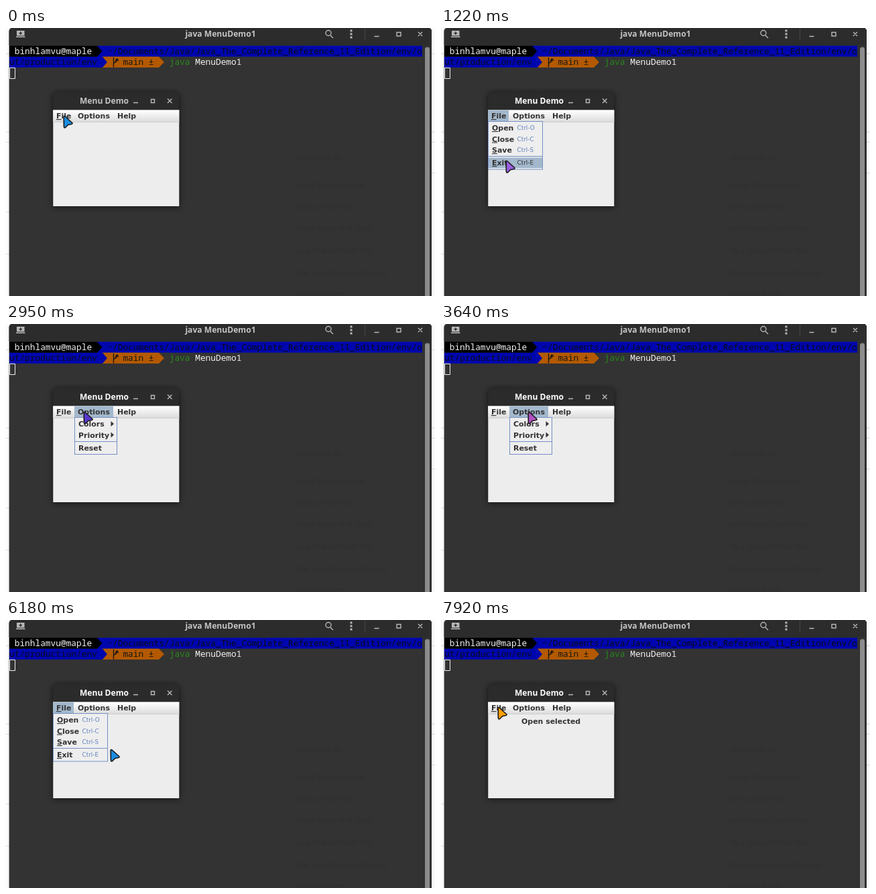
Recreate the animation shown at these times as an HTML page. Size 640x400 px, loop 8000 ms.

```html
<!DOCTYPE html>
<html lang="en">
<head>
<meta charset="utf-8">
<title>Menu Demo</title>
<style>
  html, body { margin: 0; width: 100%; height: 100%; overflow: hidden; background: #fafafa; }
  svg { display: block; width: 640px; height: 400px; }
  .title { font: bold 12.1px "Open Sans", sans-serif; text-anchor: middle; fill: #c4c4c4; }
  .term { font: 12.83px "Noto Sans Mono", monospace; }
  .path { font-weight: 500; fill: #0a0a18; }
  .ghost { font: 11.5px "Open Sans", sans-serif; fill: #2f2f2f; }
  .menu { font: bold 10.95px "DejaVu Sans", sans-serif; fill: #333; }
  .accel { font: 8.9px "DejaVu Sans", sans-serif; fill: #6382bf; }
  .hot > .accel { fill: #333; }
  .mark { fill: #a3b8cc; visibility: hidden; }
  .hot > .mark { visibility: visible; }
  .icon { fill: none; stroke: #b8b8b8; stroke-width: 1.4; }
  .popup { fill: #eee; stroke: #7590c6; }
  .key { text-decoration: underline; }
  #demo { filter: drop-shadow(0 1px 5px rgba(0, 0, 0, .65)); }
</style>
</head>
<body>
<svg viewBox="0 0 640 400">
  <defs>
    <linearGradient id="bar" x2="0" y2="1">
      <stop stop-color="#fff"/><stop offset="1" stop-color="#dadada"/>
    </linearGradient>
  </defs>
  <rect width="640" height="400" fill="#fafafa"/>
  <path d="M0 38.5H5M0 155.5H5M0 170.5H5M0 274.5H5M0 337.5H5M635 38.5h5M635 155.5h5M635 170.5h5M635 216.5h5" stroke="#d8d8d8"/>

  <!-- Terminal -->
  <path d="M4.600 400V5Q4.600 0 10 0H630Q635 0 635 5V400Z" fill="#333"/>
  <path d="M4.600 26V5Q4.600 0 10 0H630Q635 0 635 5V26Z" fill="#2c2c2c"/>
  <path d="M622 26h13v374h-13z" fill="#303030"/>
  <path d="M625 400V32a3.5 3.5 0 0 1 7 0V400z" fill="#8c8c8c"/>
  <text class="title" x="320" y="13">java MenuDemo1</text>
  <path d="M16 4h11.500v7.500H16zM15 12.500h13.500v1.500H15z" fill="#b8b8b8"/>
  <path d="M21.750 5.500v4.500M19.500 7.750h4.500" stroke="#2c2c2c" stroke-width="1.400"/>
  <path class="icon" d="M484 11l4 4M549.500 12.500h7M583 6.500h6v5.500h-6zM615 6l6 6M621 6l-6 6"/>
  <circle class="icon" cx="481" cy="7.500" r="4"/>
  <path d="M513.500 2.500h3v3h-3zM513.500 7.500h3v3h-3zM513.500 12.500h3v3h-3z" fill="#b8b8b8"/>
  <path d="M535.5 0V18" stroke="#444"/>
  <g id="ghosts" class="ghost"></g>

  <path d="M136 26.500H621V42.800H136zM5 42.800H144l7 8.100-7 8.100H5z" fill="#0006ae"/>
  <path d="M5 26.500H136l7.500 8.150-7.500 8.150H5z" fill="#000"/>
  <path d="M144 42.800H228l8 8.100-8 8.100H144l7-8.100z" fill="#b35900"/>
  <path d="M160.500 44V58.500M160.500 54q0-2.500 2.500-3t2.500-4M163 49l2.500-3 2.500 3" fill="none" stroke="#151515" stroke-width="1.3"/>
  <g class="term">
    <text x="12.700" y="39" fill="#f4f4f4">binhlamvu@maple</text>
    <g class="path">
      <text x="151.300" y="39">~/Documents/Java/Java_The_Complete_Reference_11_Edition/env/o</text>
      <text x="5" y="55">ut/production/env</text>
    </g>
    <text x="174.400" y="55" fill="#151515">main ±</text>
    <text x="243.700" y="55" fill="#278a1c">java</text>
    <text x="282.200" y="55" fill="#f0f0f0">MenuDemo1</text>
  </g>
  <path d="M5.500 59.500h8v16h-8z" fill="none" stroke="#eee"/>

  <!-- Menu window -->
  <g id="demo">
    <path d="M70.300 122H258.300V266H70.300z" fill="#ededed"/>
    <path d="M70.300 122.500V102q0-6 6-6H252.300q6 0 6 6V122.500z" fill="#2b2b2b"/>
  </g>
  <text id="caption" class="title" x="146.500" y="113">Menu Demo</text>
  <path class="icon" d="M190 111.500h7M216.500 106.500h5v5h-5zM241 105.500l6.500 6.500M247.500 105.500l-6.500 6.500"/>
  <path d="M70.300 122.500H258.300V141H70.300z" fill="url(#bar)"/>
  <path d="M70.300 140.500H258.300" stroke="#d0d0d0"/>
  <text id="result" class="menu" x="120" y="155">Open selected</text>
  <g id="menus" class="menu"></g>
  <text class="menu" x="166" y="135">Help</text>

  <path id="pointer" d="M1 1.500Q1.500.500 3 1.500L13.500 11Q14.500 12.500 12.500 13L7.500 14 3.500 18Q1.500 19 1.200 17Z"
        stroke="#191919" stroke-width="1.600" stroke-linejoin="round"/>
</svg>
<script>
const $ = id => document.getElementById(id);
const LOOP = 8000, OPENED = 350, TO_OPTIONS = 1940, TO_FILE = 4430, CHOSEN = 7300;

// Items: label, accelerator, text baseline, top and bottom of the row
const MENUS = [
  { label: 'File', key: true, x: 70, width: 31, popup: 82, bottom: 211.5, rule: 191.5, items: [
    ['Open', 'Ctrl-O', 153, 141, 157], ['Close', 'Ctrl-C', 169.5, 157, 174],
    ['Save', 'Ctrl-S', 186, 174, 190], ['Exit', 'Ctrl-E', 205, 193.5, 209]] },
  { label: 'Options', x: 102, width: 58, popup: 64, bottom: 195, rule: 175.5, items: [
    ['Colors', '>', 153, 141, 157], ['Priority', '>', 169.5, 157, 174], ['Reset', '', 189, 178, 193]] }
];

// Pointer tip: time, x, y
const PATH = [[0, 87, 131], [500, 87, 131], [1150, 98, 198], [1350, 98, 198], [2100, 103, 131],
  [2400, 103, 131], [3500, 131, 131], [3800, 131, 131], [4900, 83, 131], [5150, 83, 131],
  [6100, 157, 193], [6300, 157, 193], [7000, 100, 149], [7350, 100, 149], [7750, 86, 130], [LOOP, 86, 130]];
// Pointer colour: time, hue, saturation, lightness
const COLOURS = [[0, 205, 80, 49], [1220, 268, 66, 62], [2180, 567, 80, 51], [3640, 652, 47, 53],
  [5040, 738, 100, 58], [6180, 925, 80, 49], [7920, 1117, 100, 50], [LOOP, 1124, 100, 50]];

const smooth = u => u * u * (3 - 2 * u);

function sample(keys, time, ease = u => u) {
  const i = keys.findIndex(k => k[0] > time);
  const a = keys[i - 1], b = keys[i];
  const u = ease((time - a[0]) / (b[0] - a[0]));
  return a.slice(1).map((v, n) => v + (b[n + 1] - v) * u);
}

const mnemonic = (label, on) => on ? `<tspan class="key">${label[0]}</tspan>${label.slice(1)}` : label;

function itemMarkup(menu, [label, accel, base, top, bottom]) {
  const right = menu.x + menu.popup;
  const extra = accel === '>'
    ? `<path d="M${right - 9.5} ${base - 8}l4.500 4-4.500 4z"/>`
    : `<text class="accel" x="${menu.x + 43.5}" y="${base - 1}">${accel}</text>`;
  return `<g class="item"><rect class="mark" x="${menu.x + 1}" y="${top}" width="${menu.popup - 2}" height="${bottom - top}"/>
    <text x="${menu.x + 6}" y="${base}">${mnemonic(label, menu.key)}</text>${extra}</g>`;
}

$('menus').innerHTML = MENUS.map(m => `<g class="entry">
  <rect class="mark" x="${m.x}" y="122.5" width="${m.width}" height="16.5"/>
  <text x="${m.x + 5}" y="135">${mnemonic(m.label, m.key)}</text>
  <g class="list">
    <rect class="popup" x="${m.x + .5}" y="139.5" width="${m.popup - 1}" height="${m.bottom - 140}"/>
    <path class="popup" d="M${m.x + 1} ${m.rule}h${m.popup - 2}"/>
    ${m.items.map(item => itemMarkup(m, item)).join('')}
  </g></g>`).join('');

$('ghosts').innerHTML = ['From now on', 'using the menu bar', 'items in the lists', 'which open and close',
  'by a click on their title', 'One can also use the keys', 'to select them']
  .map((line, i) => `<text x="431" y="${i ? 205.5 + i * 32.6 : 197}">${line}</text>`).join('');

const entries = [...document.querySelectorAll('.entry')].map(el =>
  ({ el, list: el.querySelector('.list'), items: [...el.querySelectorAll('.item')] }));

function render(time) {
  const [x, y] = sample(PATH, time, smooth);
  const [hue, sat, light] = sample(COLOURS, time);
  const open = time < OPENED || time >= CHOSEN ? -1 : time >= TO_OPTIONS && time < TO_FILE ? 1 : 0;

  entries.forEach(({ el, list, items }, i) => {
    const menu = MENUS[i];
    el.classList.toggle('hot', i === open);
    list.style.display = i === open ? '' : 'none';
    items.forEach((item, n) => {
      const [, , , top, bottom] = menu.items[n];
      const over = x >= menu.x && x < menu.x + menu.popup && y >= top && y < bottom;
      item.classList.toggle('hot', over);
    });
  });
  $('caption').style.fill = time < OPENED ? '#c4c4c4' : '#fff';
  $('result').style.display = time < CHOSEN ? 'none' : '';
  $('pointer').setAttribute('transform', `translate(${x - 1.8} ${y - .5})`);
  $('pointer').style.fill = `hsl(${hue % 360} ${sat}% ${light}%)`;
}

const start = performance.now();
function tick() {
  render((performance.now() - start) % LOOP);
  requestAnimationFrame(tick);
}
tick();
</script>
</body>
</html>
```
